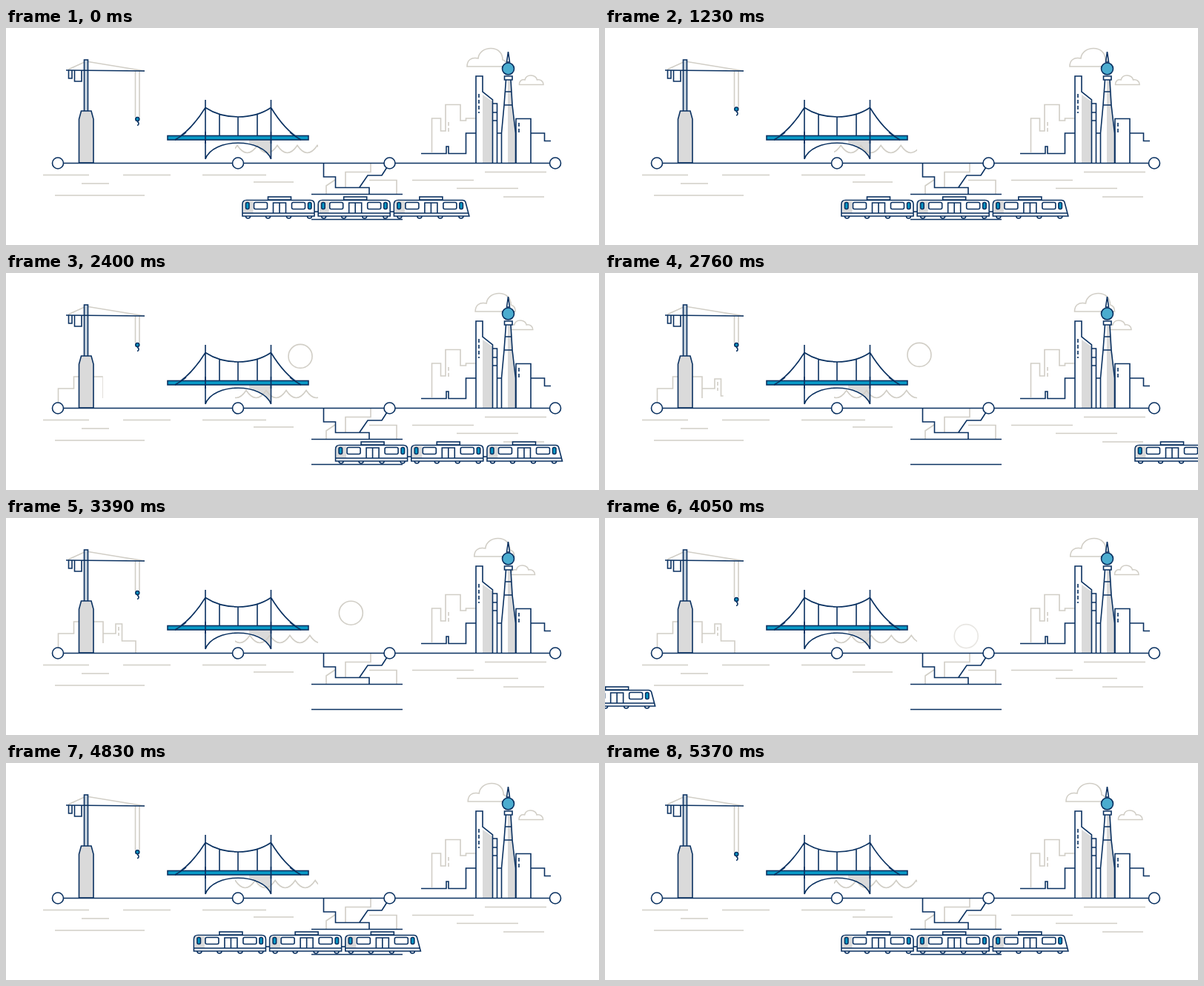
Write an HTML page that moves like this. It is 800 px wide and 293 px high and loops after 5.4 s.

```html
<!DOCTYPE html>
<html lang="en">
<head>
<meta charset="utf-8">
<title>City line</title>
<style>
  html, body { margin: 0; width: 100%; height: 100%; overflow: hidden; background: #fff; }
  svg { display: block; width: 800px; height: 293px; }
  .navy { stroke: #0a3161; stroke-width: 1.6; fill: none; }
  .gray { stroke: #d1cec6; stroke-width: 1.6; fill: none; }
  .white { fill: #fff; }
  .cyan { fill: #0799c6; }
  .shade { fill: #dadada; stroke: none; }
  .dash { stroke-dasharray: 5 3; }
</style>
</head>
<body>
<svg viewBox="0 0 800 293">
  <defs>
    <clipPath id="wipe"><rect id="wipeBox" x="60" y="130" width="0" height="60"/></clipPath>
    <clipPath id="pool"><rect x="309" y="150" width="112" height="25"/></clipPath>
    <g id="car">
      <path class="shade" d="M2 18V5Q2 1 6 1H15V18Z"/>
      <rect class="navy white" x="35" y="-4" width="31" height="4"/>
      <g class="navy">
        <rect class="cyan" x="5" y="3.5" width="4.5" height="9" rx="2"/>
        <rect class="white" x="16" y="3.5" width="18" height="9" rx="2"/>
        <path d="M42 18V4H59V18M50.5 4V18"/>
        <rect class="white" x="67" y="3.5" width="18" height="9" rx="2"/>
        <rect class="cyan" x="89" y="3.5" width="4.5" height="9" rx="2"/>
      </g>
    </g>
    <path id="wheels" class="navy white" d="M5 22a3 3 0 0 0 6 0M32 22a3 3 0 0 0 6 0M60 22a3 3 0 0 0 6 0M88 22a3 3 0 0 0 6 0"/>
  </defs>

  <!-- water -->
  <path class="gray" d="M50 198.5H112M158 198.5H222M102 210H139M66 226H187M265 198.5H351M334 208H388M548 205.5H631M608 216.5H691M646 194.5H729M671 228H726"/>

  <!-- clouds -->
  <path id="bigCloud" class="gray white" d="M622 52C622 44 627 39 637 41C638 32 646 27.500 654 27.500C664 27.500 670 34 670 43C674 44 676 48 676 52Z"/>
  <path id="smallCloud" class="gray white" d="M692.500 76.500C692.500 71 696 69 700 70C701 66 704 64 708 64C713 64 716 67 716.500 70C721 69 725 72 725 76.500Z"/>

  <!-- skyline -->
  <path class="gray" d="M574.500 168V122H586.500V139H593V103.500H613V125H620.500V122H634"/>
  <path class="gray dash" d="M597 127V140"/>
  <path class="shade" d="M643 90L656 99V182H643ZM677 70H681L687 142V182H677Z"/>
  <path class="navy" d="M560 169.500H594V160H597V169.500H620.500V142H634M634 182V65H643V86L656.500 97V182M656.500 102H662.500V182M656.500 125H662.500M656.500 114H662.500M662.500 142H669"/>
  <path class="navy dash" d="M638 89V115"/>
  <path class="navy white" d="M688 182V122.500H708V182"/>
  <path class="navy" d="M708 142H726.500V152.500H735"/>
  <path class="navy dash" d="M692 128V141"/>
  <path class="navy" d="M674.500 70L672 104L668.500 142V182M681 70L683 104L687.500 142V182M673 86H682M672 104H683"/>
  <path class="navy white" d="M672.500 65H683V70H672.500Z"/>
  <path class="navy" fill="#0a3161" d="M675.500 46L677.500 32L679.500 46Z"/>
  <circle class="navy" style="fill:#4baccf" cx="677.500" cy="55" r="8"/>

  <!-- low town, revealed left to right -->
  <g id="town" clip-path="url(#wipe)">
    <path class="gray" d="M70.500 182V156H91.500V140H131V169M131 156H148V143H156.500V166H175V182"/>
    <path class="gray dash" d="M152 147V159"/>
  </g>

  <!-- crane -->
  <path class="gray" d="M84 56L108 45L187 58"/>
  <path id="ropes" class="gray"/>
  <path class="navy" d="M84.500 57V68H89V57M92.500 57V72H102V57"/>
  <path class="navy" style="fill:#ccd8e2" d="M105.500 112V43H110.500V112"/>
  <path class="navy" d="M81 57L187 58"/>
  <path class="navy" style="fill:#dadada" d="M101.500 112H115L118 123V182H98.500V123Z"/>
  <g id="hook" class="navy">
    <circle class="cyan" cx="177.300" cy="123" r="2.500"/>
    <path d="M177 126C180 128 179.500 131 177 131.500"/>
  </g>

  <!-- bridge -->
  <circle id="sun" class="gray white" r="16"/>
  <path class="shade" d="M328 151H357V176Q348 158 328 156Z"/>
  <g clip-path="url(#pool)"><path id="waves" class="gray"/></g>
  <path class="navy" d="M269 97V177M357.500 97V177M228 151Q250 138 269 107.500Q288 120 313 120Q339 120 357.500 107.500Q376 138 398 151M288 117V146M313 120V146M339 117V146M269 177C279 148 347 148 357.500 177"/>
  <rect class="navy cyan" x="218" y="145.500" width="190" height="5.500"/>
  <path class="navy" d="M228 151Q237 146 243 141M398 151Q389 146 383 141M269 140V156M357.500 140V156"/>

  <!-- station -->
  <path class="gray" d="M432 224V213L444 205M458 215V194.500H492V182M490 205.500H527V224"/>
  <path class="navy" d="M412 224.500H535M412 258.500H535M428.500 182V201H444.500V215.500H490V224M477 215L488 199H507L514 188"/>

  <!-- route -->
  <path class="navy" d="M70 182.500H741"/>
  <g class="navy white">
    <circle cx="70" cy="182.500" r="7.500"/><circle cx="313" cy="182.500" r="7.500"/>
    <circle cx="517.500" cy="182.500" r="7.500"/><circle cx="741" cy="182.500" r="7.500"/>
  </g>

  <g id="train"></g>
</svg>
<script>
  const LOOP = 5400, HALF = LOOP / 2;
  const $ = id => document.getElementById(id);
  const clamp = v => Math.min(1, Math.max(0, v));
  const sine = v => (1 - Math.cos(Math.PI * clamp(v))) / 2;
  const move = (id, x, y = 0) => $(id).setAttribute('transform', `translate(${x} ${y})`);

  // Three cars; the last one has a slanted nose.
  const square = 'M0.500 22V6Q0.500 0.500 6 0.500H92Q97.500 0.500 97.500 6V22Z';
  const nose = 'M0.500 22V6Q0.500 0.500 6 0.500H93Q96 0.500 97 3L102 22Z';
  $('train').innerHTML = [0, 1, 2].map(i => `<g transform="translate(${318.500 + i * 102.200} 232)">
    ${i < 2 ? '<path class="navy" d="M97 16H102.500"/>' : ''}
    <use href="#wheels"/><path class="navy white" d="${i < 2 ? square : nose}"/><use href="#car"/>
    <path class="navy" d="M0.500 18H${i < 2 ? 97.500 : 101}"/></g>`).join('');

  const PERIOD = 27;
  $('waves').setAttribute('d', 'M258 158.500' + `q${PERIOD / 2} 20 ${PERIOD} 0`.repeat(7));

  function trainX(t) {
    const POWER = 1.73;
    if (t < 3400) return 125 * Math.max(0, (t - 2019) / 381) ** POWER;
    return -207 * Math.max(0, (5150 - t) / 620) ** POWER;
  }

  function draw(t) {
    const sway = t < HALF ? sine(t / HALF) : sine((LOOP - t) / HALF);
    move('bigCloud', 11.5 * sway);
    move('smallCloud', -15 * sway ** 1.6);

    const lift = 26 * (t < HALF ? sine(t / 2400) : sway);
    move('hook', 0, -lift);
    $('ropes').setAttribute('d', `M174.500 58V${120 - lift}M180 58V${120 - lift}`);

    move('waves', PERIOD * t / LOOP);
    move('train', trainX(t));

    const angle = Math.PI / 2 * Math.sin((t - 2655) * 0.000634);
    move('sun', 416 + 76 * Math.sin(angle), 186 - 76 * Math.cos(angle));
    $('sun').style.opacity = Math.min(clamp((t - 1260) / 300), clamp((4200 - t) / 300));

    const left = 1 - clamp((t - 1910) / 1420);
    $('wipeBox').setAttribute('width', 9 + 108 * (1 - left * left));
    $('town').style.display = t > 1910 && t < 4545 ? '' : 'none';
  }

  function tick() {
    draw(performance.now() % LOOP);
    requestAnimationFrame(tick);
  }
  tick();
</script>
</body>
</html>
```
